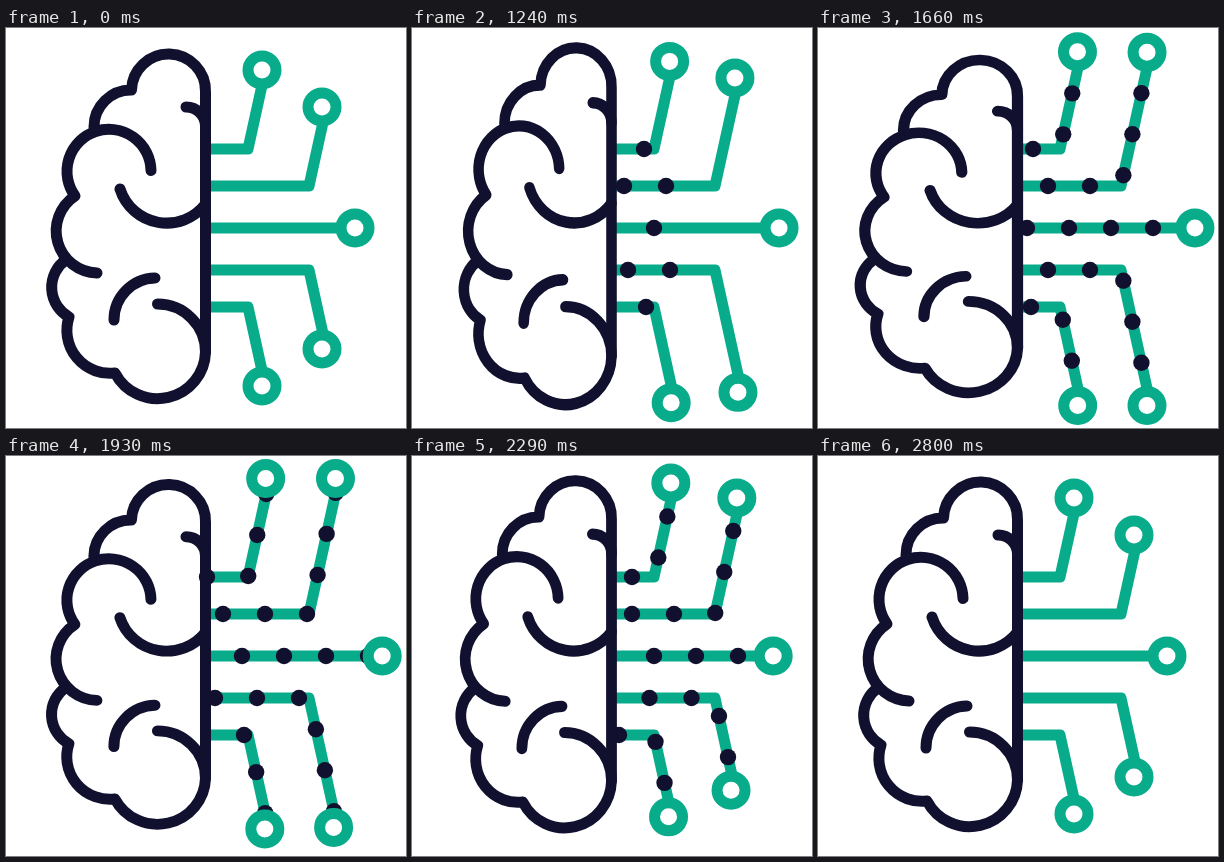
Animation, 400 px wide and 400 px high, one loop 2.83 s. Source, as an HTML page:

```html
<!DOCTYPE html>
<html lang="en">
<head>
<meta charset="utf-8">
<title>Brain circuit</title>
<style>
  html, body { margin: 0; width: 100%; height: 100%; overflow: hidden; background: #fff; }
  svg { display: block; width: 100%; height: 100%; }
  .wire, .ring { stroke: #08ac8b; stroke-width: 11; stroke-linejoin: round; }
  .wire { fill: none; }
  .ring { fill: #fff; }
  .dot { fill: #11112f; }
  #brain { fill: none; stroke: #11112f; stroke-width: 11; stroke-linecap: round; stroke-linejoin: round; }
</style>
</head>
<body>
<svg viewBox="0 0 400 400">
  <g id="circuit"></g>
  <g id="brain">
    <path d="M151.5 276A48 48 0 0 1 199.5 324A48 48 0 0 1 109 345A43 43 0 0 1 63 289A34 34 0 0 1 59.5 232"/>
    <path d="M91 245A42 42 0 0 1 69 168A42 42 0 1 1 145 142.5"/>
    <path d="M88 99A37 37 0 0 1 125.5 62A37 37 0 0 1 199.5 64V324"/>
    <path d="M180 79A19.5 19.5 0 0 1 199.5 98.5"/>
    <path d="M114 161A49 49 0 0 0 199.5 176"/>
    <path d="M108 292A42 42 0 0 1 149 250"/>
  </g>
</svg>
<script>
const LOOP = 2830, STEP = 30, LEAD = 1000;
const ROOT = 200, SLOPE = 0.22, SPACING = 42, MAX_DOTS = 6;

// dir: -1 bends up, 1 bends down, 0 is straight.
// out / back: step ranges of the node's travel; front: distance of the leading dot.
const branches = [
  { y: 121, elbow: 242, dir: -1, rest: [256, 42], far: [259.7, 22.5],
    out: [2.2, 35], back: [35, 60], front: [4, 32, 141, 127, 104, 4] },
  { y: 158, elbow: 303, dir: -1, rest: [316, 79], far: [329.5, 22.5],
    out: [1.6, 31.6], back: [32, 59.5], front: [6, 54, 240, 227, 188, 6] },
  { y: 200, elbow: Infinity, dir: 0, rest: [349, 200], far: [377, 200],
    out: [1, 25], back: [28, 55.7], front: [6, 42, 177, 162, 126, 6] },
  { y: 242, elbow: 303, dir: 1, rest: [316, 321], far: [329, 377.5],
    out: [0.8, 19.5], back: [25.5, 51.3], front: [6, 58, 240, 219, 163.5, 6] },
  { y: 279, elbow: 242, dir: 1, rest: [256, 358], far: [259.7, 377.5],
    out: [0.7, 16], back: [22, 50], front: [4, 34, 139, 122, 91, 4] }
];
const frontSteps = [1, 8, 22, 31, 43, 59];

const wobbleSteps = [0, 8, 24, 38, 60];
const wobbleX = [1, 0.96, 1.025, 0.977, 1];
const wobbleY = [1, 1.035, 0.963, 1.008, 1];

const lerp = (a, b, p) => a + (b - a) * p;
const progress = (t, [start, end]) => Math.min(1, Math.max(0, (t - start) / (end - start)));
const easeOut = p => 1 - (1 - p) ** 3;
const easeInOut = p => (1 - Math.cos(Math.PI * p)) / 2;

function segment(steps, t) {
  let i = 0;
  while (i < steps.length - 2 && t >= steps[i + 1]) i++;
  return i;
}

function easedKeys(steps, values, t) {
  const i = segment(steps, t);
  return lerp(values[i], values[i + 1], easeInOut(progress(t, [steps[i], steps[i + 1]])));
}

// Cubic Hermite curve through uneven keys.
function smoothKeys(steps, values, t) {
  const span = i => steps[i + 1] - steps[i];
  const rate = i => (values[i + 1] - values[i]) / span(i);
  const tangent = i => {
    if (i === 0) return rate(0);
    if (i === steps.length - 1) return rate(i - 1);
    return (rate(i - 1) * span(i) + rate(i) * span(i - 1)) / (span(i - 1) + span(i));
  };
  const i = segment(steps, t), h = span(i), p = (t - steps[i]) / h, q = 1 - p;
  return values[i] * (1 + 2 * p) * q * q + h * tangent(i) * p * q * q
       + values[i + 1] * p * p * (3 - 2 * p) - h * tangent(i + 1) * p * p * q;
}

function pointAlong(b, distance) {
  const past = distance - (b.elbow - ROOT);
  if (past <= 0) return [ROOT + distance, b.y];
  const rise = past / Math.hypot(1, SLOPE);
  return [b.elbow + rise * SLOPE, b.y + b.dir * rise];
}

function add(name, className, attrs = {}) {
  const el = document.createElementNS("http://www.w3.org/2000/svg", name);
  el.setAttribute("class", className);
  set(el, attrs);
  document.getElementById("circuit").append(el);
  return el;
}

function set(el, attrs) {
  for (const key in attrs) el.setAttribute(key, attrs[key]);
}

for (const b of branches) {
  b.wire = add("path", "wire");
  b.dots = Array.from({ length: MAX_DOTS }, () => add("circle", "dot", { r: 8.2 }));
  b.ring = add("circle", "ring", { r: 14 });
}
const brain = document.getElementById("brain");

function drawBranch(b, step) {
  const reach = easeOut(progress(step, b.out)) * (1 - easeInOut(progress(step, b.back)));
  const x = lerp(b.rest[0], b.far[0], reach);
  const y = lerp(b.rest[1], b.far[1], reach);
  set(b.ring, { cx: x, cy: y });

  if (b.dir) {
    const endY = y - b.dir * 14;
    const endX = b.elbow + SLOPE * Math.abs(endY - b.y);
    set(b.wire, { d: `M${ROOT} ${b.y}H${b.elbow}L${endX} ${endY}` });
  } else {
    set(b.wire, { d: `M${ROOT} ${b.y}H${x - 14}` });
  }

  const active = step >= frontSteps[0] && step <= frontSteps.at(-1);
  const front = active ? smoothKeys(frontSteps, b.front, step) : 0;
  b.dots.forEach((dot, i) => {
    const distance = front - i * SPACING;
    const shown = active && distance > 0.8;
    const [cx, cy] = pointAlong(b, Math.max(0, distance));
    set(dot, { cx, cy, visibility: shown ? "visible" : "hidden" });
  });
}

function draw(time) {
  const t = time % LOOP;
  const step = t < LEAD + STEP ? 0 : Math.floor((t - LEAD) / STEP);
  branches.forEach(b => drawBranch(b, step));
  const sx = easedKeys(wobbleSteps, wobbleX, step);
  const sy = easedKeys(wobbleSteps, wobbleY, step);
  set(brain, { transform: `translate(199.5 200) scale(${sx} ${sy}) translate(-199.5 -200)` });
}

const begin = performance.now();
function tick() {
  draw(performance.now() - begin);
  requestAnimationFrame(tick);
}
tick();
</script>
</body>
</html>
```
